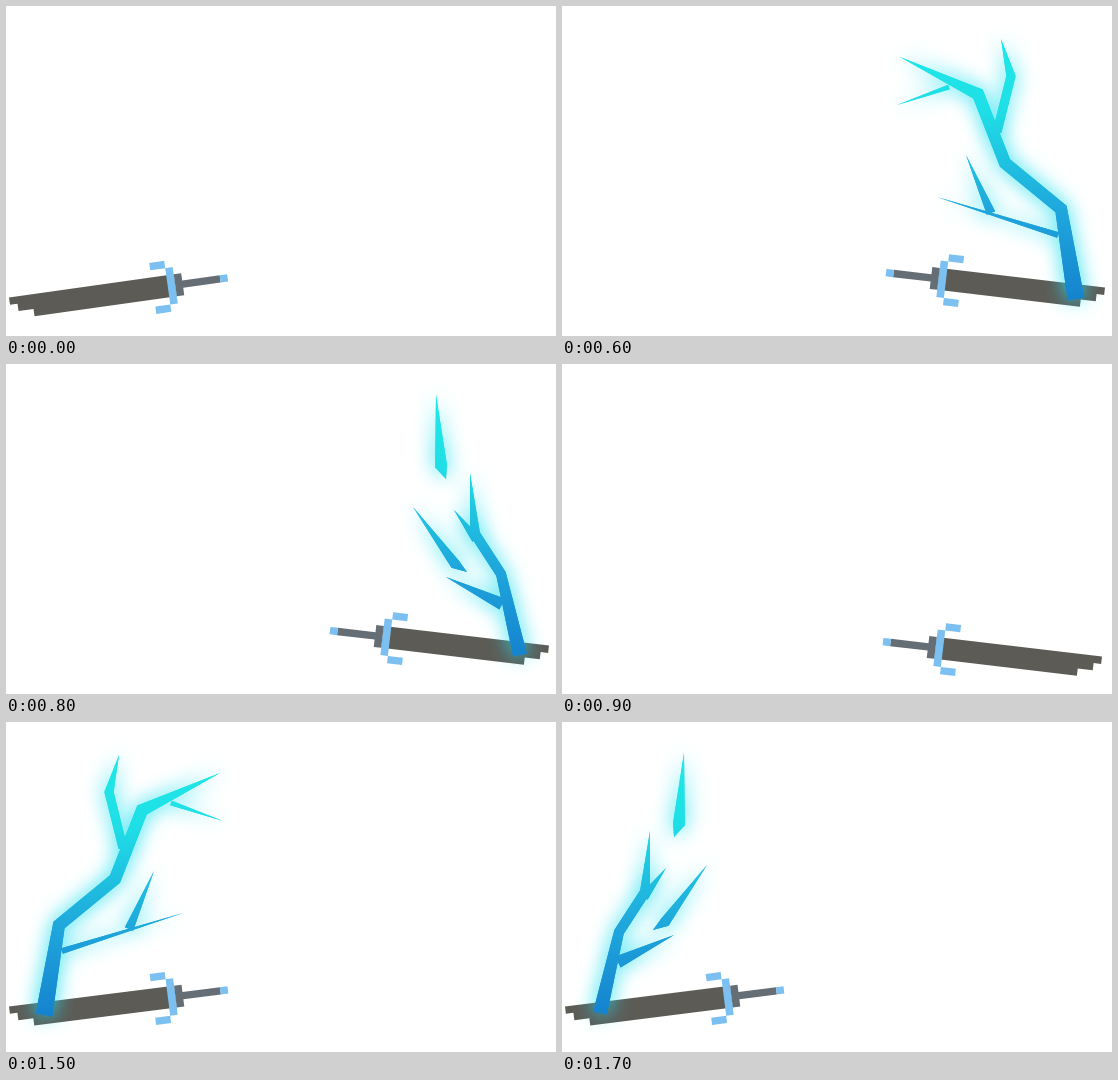
Animation of 550 by 330 pixels, one loop 1800 ms. Source, as an HTML page with a canvas:

```html
<!DOCTYPE html>
<html lang="en">
<head>
<meta charset="utf-8">
<title>Lightning sword</title>
<style>
html, body { margin: 0; width: 100%; height: 100%; overflow: hidden; background: #fff; }
canvas { display: block; }
</style>
</head>
<body>
<canvas id="stage" width="550" height="330"></canvas>
<script>
const ctx = document.getElementById("stage").getContext("2d");
const LOOP = 1800;
const CELL = { length: 7.56, width: 7.35 }; // one sword pixel
const MIRROR = 552;

// A ribbon follows its key points at an even width and ends in a tip;
// "root" scales the width at its first point.
function ribbon(width, route, root) {
  const points = route.split(" ").map(point => point.split(",").map(Number));
  const last = points.length - 1;
  const normals = points.slice(1).map(([x, y], i) => {
    const dx = x - points[i][0], dy = y - points[i][1], length = Math.hypot(dx, dy);
    return [-dy / length, dx / length];
  });
  const side = sign => points.map(([x, y], i) => {
    const [ax, ay] = normals[Math.max(i - 1, 0)];
    const [bx, by] = normals[Math.min(i, last - 1)];
    const scale = i === 0 ? root : i === last ? 0 : 1;
    const reach = sign * scale * width / 2 / (1 + ax * bx + ay * by);
    return [x + (ax + bx) * reach, y + (ay + by) * reach];
  });
  const outline = [...side(1), ...side(-1).reverse()];
  return { path: new Path2D("M" + outline.join(" ") + "Z"), heights: points.map(([, y]) => y) };
}
const trunk = (width, route) => ribbon(width, route, 1.4);
const branch = (width, route) => ribbon(width, route, 1);
const sliver = (width, route) => ribbon(width, route, 0);

// "split" gives every shard its own gradient.
const swingRight = { split: true, shards: [
  trunk(9, "212,17 150,86 150,167 109,256"),
  branch(11, "152,86 90,113 65,168"),
  branch(7, "149,168 162,196 169,236"),
  sliver(4, "106,54 155,51 163,47"),
  branch(5, "182,57 186,109"),
  branch(6, "108,121 101,172")
] };
const swingLeft = { shards: [
  trunk(10, "326,25 395,128 396,195 403,294"),
  branch(9, "399,152 428,169 470,228"),
  branch(6, "374,91 414,89"),
  branch(8, "350,73 349,131")
] };
const fresh = { shards: [
  trunk(12, "38,293 53,203 109,157 136,88 214,51"),
  branch(9, "117,126 103,70 113,33"),
  branch(5, "165,81 217,99"),
  branch(6, "56,229 177,191"),
  branch(9, "123,207 148,149")
] };
const broken = { split: true, shards: [
  trunk(9, "515,296 463,215 458,131 383,86"),
  branch(7, "478,243 428,237 362,200"),
  branch(7, "428,113 410,39"),
  sliver(8, "368,150 420,169 439,178"),
  sliver(9, "505,122 509,180 499,221")
] };
const fading = { shards: [
  trunk(10, "38,291 57,210 83,170 88,109"),
  branch(9, "82,175 104,146"),
  branch(12, "56,240 112,213"),
  sliver(10, "91,208 103,200 145,143"),
  sliver(12, "112,115 117,102 122,31")
] };

// Sword poses: blade tip position, angle in degrees, flipped or not.
const restLeft = [3, 291.5, -8, 1];
const restRight = [540, 292.6, 6.8, -1];
const hitLeft = [3, 284.5, -7.2, 1];
const hitRight = [543, 281.6, 6.8, -1];

const scenes = [
  { start: 0, pose: restLeft },
  { start: 500, pose: [203, 2, -91.6, -1], bolt: swingRight },
  { start: 600, pose: hitRight, bolt: fresh, mirrored: true },
  { start: 700, pose: hitRight, bolt: broken },
  { start: 800, pose: hitRight, bolt: fading, mirrored: true },
  { start: 900, pose: restRight },
  { start: 1400, pose: [313.5, 1, -86.7, -1], bolt: swingLeft },
  { start: 1500, pose: hitLeft, bolt: fresh },
  { start: 1600, pose: hitLeft, bolt: broken, mirrored: true },
  { start: 1700, pose: hitLeft, bolt: fading }
];

const blade = new Path2D("M0,0H22V3H3V2H1V1H0Z");
const handle = new Path2D("M22,0h1v1h5v1h-5v1h-1Z");
const guard = new Path2D("M21,-1h1v5h-1ZM19,-2h2v1h-2ZM19,4h2v1h-2ZM28,1h1v1h-1Z");

function drawSword([x, y, angle, flip]) {
  ctx.save();
  ctx.translate(x, y);
  ctx.rotate(angle * Math.PI / 180);
  ctx.scale(flip * CELL.length, CELL.width);
  for (const [part, color] of [[blade, "#5c5b56"], [handle, "#656d75"], [guard, "#7bc0f0"]]) {
    ctx.fillStyle = color;
    ctx.fill(part);
  }
  ctx.restore();
}

function verticalGradient(shards) {
  const heights = shards.flatMap(shard => shard.heights);
  const gradient = ctx.createLinearGradient(0, Math.min(...heights), 0, Math.max(...heights));
  gradient.addColorStop(0, "#1ee8e8");
  gradient.addColorStop(0.27, "#1fdfe6");
  gradient.addColorStop(0.65, "#1fa8dc");
  gradient.addColorStop(1, "#1583cf");
  return gradient;
}

function drawBolt({ shards, split }, mirrored) {
  ctx.save();
  if (mirrored) ctx.transform(-1, 0, 0, 1, MIRROR, 0);
  // Glow first, then clean shards on top.
  for (const glow of ["#1ee0f0", "transparent"]) {
    ctx.shadowColor = glow;
    ctx.shadowBlur = 20;
    for (const shard of shards) {
      ctx.fillStyle = verticalGradient(split ? [shard] : shards);
      ctx.fill(shard.path);
    }
  }
  ctx.restore();
}

function render(time) {
  const scene = scenes.findLast(({ start }) => start <= time);
  ctx.clearRect(0, 0, 550, 330);
  drawSword(scene.pose);
  if (scene.bolt) drawBolt(scene.bolt, scene.mirrored);
}

const begin = performance.now();
function tick() {
  render((performance.now() - begin) % LOOP);
  requestAnimationFrame(tick);
}
tick();
</script>
</body>
</html>
```
